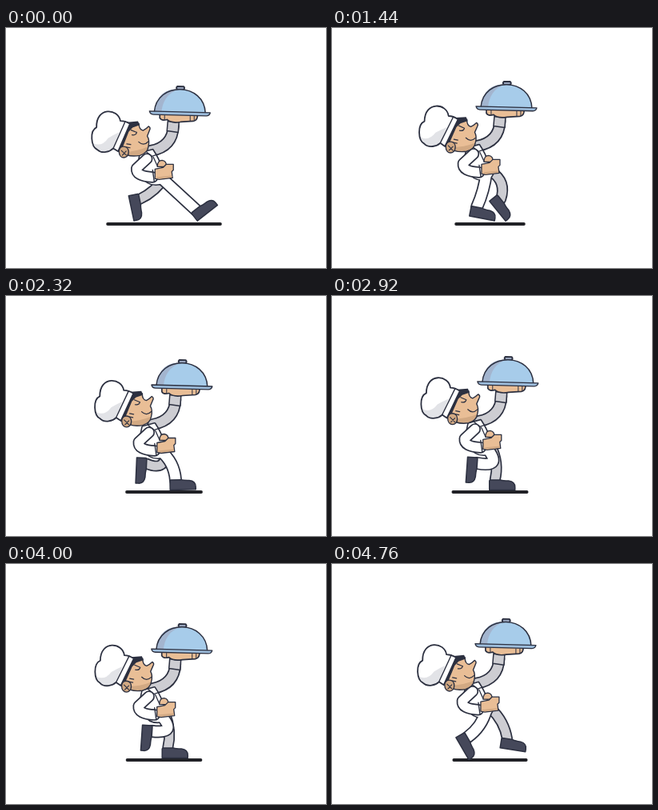
These frames come from a looping animation (400x300 px, 4.8 s). An HTML page with a canvas:

```html
<!DOCTYPE html>
<html lang="en">
<head>
<meta charset="utf-8">
<title>Walking chef</title>
<style>
html, body { margin: 0; width: 100%; height: 100%; overflow: hidden; background: #fff; }
canvas { display: block; width: 400px; height: 300px; }
</style>
</head>
<body>
<canvas id="stage"></canvas>
<script>
const LOOP = 4800, STEP = 40, CYCLE = 1070, HALF = CYCLE / 2, LEG = 48;
const INK = '#2c3040', SKIN = '#e9be96', SKIN_DARK = '#d2a983', GREY = '#cdcdd2',
      SHOE = '#45485a', BLUE = '#a7ccea', BLUE_DARK = '#a3b5cf', SHADE = '#e2e3e7';

const canvas = document.getElementById('stage');
const ctx = canvas.getContext('2d');
const ratio = Math.max(1, window.devicePixelRatio || 1);
canvas.width = 400 * ratio;
canvas.height = 300 * ratio;

// Key poses of one foot through a stride
const STRIDE = [
  { t: 0, x: 237, y: 227, angle: -38 },     // heel strike
  { t: 80, x: 224, y: 229, angle: -3 },     // flat
  { t: 250, x: 203, y: 230, angle: 0 },     // carry
  { t: 370, x: 181, y: 224, angle: 11 },    // roll
  { t: 535, x: 167, y: 214, angle: 78 },    // toe off
  { t: 785, x: 182, y: 209, angle: 94 },    // fold
  { t: 905, x: 211, y: 214, angle: 51 },    // swing
  { t: 1015, x: 219, y: 218.5, angle: 9 }   // reach
];

// Monotone cubic through the periodic poses
function footAt(time) {
  const t = time % CYCLE, n = STRIDE.length;
  const pose = i => STRIDE[(i + n) % n];
  const at = i => pose(i).t + Math.floor(i / n) * CYCLE;
  let i = n - 1;
  while (at(i) > t) i--;
  const h = at(i + 1) - at(i), u = (t - at(i)) / h, v = 1 - u;
  const blend = prop => {
    const slope = j => (pose(j + 1)[prop] - pose(j)[prop]) / (at(j + 1) - at(j));
    const tangent = j => {
      const a = slope(j - 1), b = slope(j);
      return a * b > 0 ? 2 * a * b / (a + b) : 0;
    };
    return pose(i)[prop] * (1 + 2 * u) * v * v + pose(i + 1)[prop] * u * u * (3 - 2 * u)
      + h * u * v * (tangent(i) * v - tangent(i + 1) * u);
  };
  return { x: blend('x'), y: blend('y'), angle: blend('angle') };
}

// Swings between mid - size and mid + size once per step, highest at peak
const sway = (time, mid, size, peak) =>
  mid + size * Math.cos(2 * Math.PI * (time - peak) / HALF);

function shape(d, fill, line = INK, width = 1.7) {
  const path = new Path2D(d);
  if (fill) { ctx.fillStyle = fill; ctx.fill(path); }
  if (line) { ctx.strokeStyle = line; ctx.lineWidth = width; ctx.stroke(path); }
}

function tube(d, fill, width) {
  shape(d, null, INK, width);
  shape(d, null, fill, width - 3.4);
}

function placed(x, y, angle, draw) {
  ctx.save();
  ctx.translate(x, y);
  ctx.rotate(angle * Math.PI / 180);
  draw();
  ctx.restore();
}

// Rubber-hose leg: the knee bows forward as the leg gets shorter
function legPath(foot, hipX, hipY) {
  const dx = foot.x - hipX, dy = foot.y - hipY, reach = Math.hypot(dx, dy);
  const bend = 1.25 * Math.max(0, LEG - reach) / reach;
  const kneeX = hipX + dx / 2 + dy * bend, kneeY = hipY + dy / 2 - dx * bend;
  return `M${hipX} ${hipY}Q${kneeX} ${kneeY} ${foot.x} ${foot.y}`;
}

function drawShoe({ x, y, angle }) {
  placed(x, y, angle, () =>
    shape('M-6 0H7Q10 1 17 1Q25 2 25 9V12.5H-7V1Z', SHOE, INK, 1.5));
}

function drawTray() {
  tube('M184 161Q211 156 212 130', GREY, 15);
  shape('M205 124L219 125L218 138L204 136Z', GREY, INK, 1.5);
  shape('M195 115V120Q197 124 204 122Q209 127 221 125L237 124Q243 123 242 115Z', SKIN);
  shape('M201 117V122M233 118V124M238 118V123', null, INK, 1);
  placed(220, 114.5, 1.5, () => {
    const dome = 'M-32 -1C-30 -40 30 -40 32 -1Z';
    shape('M-4 -34H4Q6 -32 4 -30H-4Q-6 -32 -4 -34Z', '#98a4bc', INK, 1.8);
    shape(dome, BLUE, null);
    shape('M-32 -1C-30 -25 -15 -31 -3 -30C-16 -25 -22 -15 -23 -1Z', BLUE_DARK, null);
    shape(dome, null, INK, 1.5);
    shape('M-38 -2H38Q37 2 33 2H-33Q-37 2 -38 -2Z', '#9dbddc', INK, 1.3);
  });
}

function drawNearArm() {
  tube('M179 171L166 183Q165 193 186 194', '#fff', 14.5);
  shape('M186 185L188 199', null, INK, 1.4);
  shape('M192 181Q192 173 198 173Q204 174 203 181Z', SKIN, INK, 1.3);
  shape('M189 184L199 182L203 178H212V185L210 187L211 195L194 197L189 196Z', SKIN, INK, 1.3);
  shape('M190 194L210 192V194L194 196Z', SKIN_DARK, null);
}

function drawHead() {
  const face = 'M156 123H171Q171 131 176 132Q180 130 183 127Q186 129 184 132L181 139'
    + 'Q184 144 182 152Q181 160 171 163Q156 165 148 158L147 152Z';
  shape(face, SKIN, null);
  shape('M150 158Q168 158 182 152Q181 160 171 163Q156 165 150 158Z', SKIN_DARK, null);
  shape(face, null, INK, 1.4);
  shape('M157 121L170 120L172 125L163 128L158 133L149 154L145 154Z', INK, null);
  shape('M161 131L168 134M162 137Q167 138 168 134M170 146Q176 152 182 146'
    + 'M155 148L160 149M154 152L159 153', null, INK, 1.2);
  shape('M145 157C145 149 157 149 157 158C157 167 145 168 145 157Z', SKIN_DARK, INK, 1.4);
  shape('M148 156L154 162M154 157L149 162', null, INK, 1.1);

  const hat = 'M160 123Q154 119 148 119C146 103 118 100 118 126'
    + 'C109 130 110 150 118 154C124 160 134 157 138 153L144 157Z';
  shape(hat, '#fff', null);
  shape('M113 146Q124 151 132 140Q139 136 146 133L138 153Q131 160 118 154Z', SHADE, null);
  shape(hat, null, INK, 1.8);
  shape('M154 120L138 153', null, INK, 1.4);
}

function draw(time) {
  const phase = time % CYCLE;
  const bodyX = sway(phase, -1.6, 1.5, 210), bodyY = sway(phase, -7, 7.3, 140);
  const headX = sway(phase, -2.2, 2, 210), headY = sway(phase, -4.3, 4.7, 110);
  const tilt = sway(phase, -0.6, 1.6, 320);
  const sinceStrike = phase % HALF;
  const fromStrike = Math.min(sinceStrike, HALF - sinceStrike);
  const shadow = sway(phase, 43.5, 3, 200) + 29 * Math.exp(-fromStrike / 30);
  const white = footAt(phase), grey = footAt(phase + HALF);

  ctx.setTransform(ratio, 0, 0, ratio, 0, 0);
  ctx.fillStyle = '#fff';
  ctx.fillRect(0, 0, 400, 300);
  ctx.lineCap = ctx.lineJoin = 'round';
  shape(`M${197.5 - shadow} 245H${197.5 + shadow}`, null, '#202126', 3.8);

  placed(bodyX, bodyY, 0, drawTray);
  tube(legPath(grey, 199, 193 + bodyY), GREY, 14);
  drawShoe(grey);

  const torso = 'M171 164L186 160Q194 172 197 183L203 196Q200 203 190 203Q178 203 174 193L168 178Z';
  const leg = legPath(white, 193, 194 + bodyY);
  placed(bodyX, bodyY, 0, () => shape(torso, '#fff', INK, 3.2));
  shape(leg, null, INK, 16);
  placed(bodyX, bodyY, 0, () => shape(torso, '#fff', null));
  shape(leg, null, '#fff', 12.6);
  drawShoe(white);

  placed(bodyX, bodyY, 0, () => {
    shape('M178 162L185 168L191 166M187 169L192 180', null, INK, 1.3);
    drawNearArm();
  });
  placed(151 + headX, 158 + headY, tilt, () => {
    ctx.translate(-151, -158);
    drawHead();
  });
}

const start = performance.now();
function tick() {
  const time = (performance.now() - start) % LOOP;
  draw(Math.floor(time / STEP) * STEP);
  requestAnimationFrame(tick);
}
tick();
</script>
</body>
</html>
```
